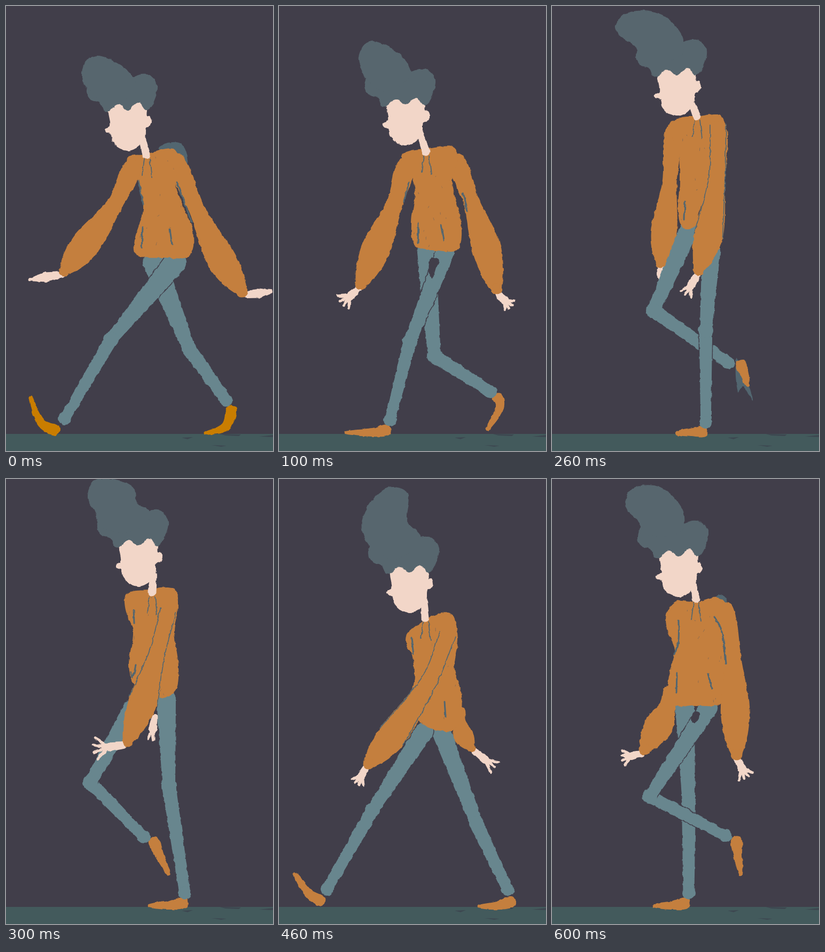
Write an HTML page that moves like this. It is 500 px wide and 833 px high and loops after 0.7 s.

```html
<!DOCTYPE html>
<html lang="en">
<head>
<meta charset="utf-8">
<title>Walk cycle</title>
<style>
html, body { margin: 0; width: 100%; height: 100%; overflow: hidden; background: #413e4a; }
svg { display: block; width: 100%; height: 100%; }
</style>
</head>
<body>
<svg id="stage" viewBox="0 0 500 833">
  <filter id="rough" filterUnits="userSpaceOnUse" x="0" y="0" width="500" height="833" color-interpolation-filters="sRGB">
    <feTurbulence type="fractalNoise" baseFrequency=".09" numOctaves="2" seed="4"/>
    <feDisplacementMap in="SourceGraphic" scale="5" xChannelSelector="R" yChannelSelector="G"/>
  </filter>
  <rect width="500" height="833" fill="#413e4a"/>
  <rect y="801" width="500" height="32" fill="#435a5c"/>
  <path fill="#3d4750" d="M329 808l21-1-10 4zM400 801l40 1-4 3-25-1zM474 806l26-3v4zM385 822l28 1-10 2z"/>
</svg>
<script>
const STEP = 100, COUNT = 7;
const SKIN = '#f2d6c8', CLOTH = '#c47f3e', OCHRE = '#c97d00', JEANS = '#68868e';
const HAIR = '#57666e', SHADE = '#526670', NIGHT = '#413e4a';
const SLEEVE = [15, 15, 27, 10], SHOE = [9, 8, 3];

// Head parts, measured from the left cheek line and the chin
const FACE = '0,-85 35,-92 68,-88 70,-65 75,-65 79,-54 74,-45 68,-43 66,-25 54,-8 36,0 18,-5 6,-17 2,-31 -6,-34 -8,-40 1,-46';
const CURLS = '-3,-73 16,-87 34,-76 54,-90 69,-76 82,-90 90,-122 76,-141 60,-143 42,-138 -30,-138 -43,-114 -37,-97 -18,-89 -11,-75';

const stage = document.getElementById('stage');
const parse = text => text.split(' ').map(p => p.split(',').map(Number));
const shift = (pts, [dx, dy]) => pts.map(([x, y]) => [x + dx, y + dy]);

function add(parent, tag, attrs) {
  const node = document.createElementNS('http://www.w3.org/2000/svg', tag);
  for (const key in attrs) node.setAttribute(key, attrs[key]);
  return parent.appendChild(node);
}

// Smooth curve whose handles scale with each segment, so it never overshoots
function curve(pts, closed) {
  const n = pts.length;
  const at = i => closed ? pts[(i + n) % n] : pts[Math.max(0, Math.min(n - 1, i))];
  const handle = (i, len) => {
    const [ax, ay] = at(i - 1), [bx, by] = at(i + 1);
    const k = 0.3 * len / (Math.hypot(bx - ax, by - ay) || 1);
    return [(bx - ax) * k, (by - ay) * k];
  };
  let d = 'M' + pts[0];
  for (let i = 0; i < (closed ? n : n - 1); i++) {
    const [x0, y0] = at(i), [x1, y1] = at(i + 1);
    const len = Math.hypot(x1 - x0, y1 - y0);
    const [ux, uy] = handle(i, len), [vx, vy] = handle(i + 1, len);
    d += `C${x0 + ux} ${y0 + uy} ${x1 - vx} ${y1 - vy} ${x1} ${y1}`;
  }
  return d + (closed ? 'Z' : '');
}

// The two sides of a spine with a radius at every node
function sides(spine, radii) {
  const side = sign => spine.map(([x, y], i) => {
    const [ax, ay] = spine[Math.max(0, i - 1)], [bx, by] = spine[Math.min(spine.length - 1, i + 1)];
    const k = sign * radii[i] / Math.hypot(bx - ax, by - ay);
    return [x + (by - ay) * k, y - (bx - ax) * k];
  });
  return [side(1), side(-1)];
}

// Tapered bar with round ends
function bone([ax, ay], ra, [bx, by], rb) {
  const len = Math.hypot(bx - ax, by - ay), nx = (ay - by) / len, ny = (bx - ax) / len;
  return `M${ax + nx * ra} ${ay + ny * ra}L${bx + nx * rb} ${by + ny * rb}` +
    `A${rb} ${rb} 0 0 0 ${bx - nx * rb} ${by - ny * rb}` +
    `L${ax - nx * ra} ${ay - ny * ra}A${ra} ${ra} 0 0 0 ${ax + nx * ra} ${ay + ny * ra}Z`;
}

function random(seed) {
  return () => (seed = seed * 16807 % 2147483647) / 2147483647;
}

let index = 0;

function pose(p) {
  const group = add(stage, 'g', { filter: 'url(#rough)', opacity: 0 });
  const fill = (d, color, more) => add(group, 'path', { d, fill: color, ...more });
  const blob = (pts, color) => fill(curve(pts, true), color);
  const line = (pts, width) => fill(curve(pts), 'none', { stroke: SHADE, 'stroke-width': width, 'stroke-linecap': 'round' });
  const dot = ([cx, cy], r, color) => add(group, 'circle', { cx, cy, r, fill: color });

  function spineShape(spine, radii, color) {
    const [a, b] = sides(spine, radii);
    blob([...a, ...b.reverse()], color);
  }

  function hand(text, fingers) {
    const [wrist, tip] = parse(text);
    const dx = tip[0] - wrist[0], dy = tip[1] - wrist[1];
    const palm = [wrist[0] + dx * 0.5, wrist[1] + dy * 0.5];
    fill(bone(wrist, 6, palm, fingers ? 8 : 9), SKIN);
    if (!fingers) fill(bone(palm, 9, tip, 3), SKIN);
    for (let i = 0; i < fingers; i++) {
      const turn = (i - (fingers - 1) / 2) * 0.42, c = Math.cos(turn) * 0.5, s = Math.sin(turn) * 0.6;
      fill(bone(palm, 4, [palm[0] + dx * c - dy * s, palm[1] + dy * c + dx * s], 2.2), SKIN);
    }
  }

  function arm({ sleeve, palm, fingers = 0, slim = 1, over }) {
    hand(palm, fingers);
    if (!sleeve) return;
    const spine = parse(sleeve), radii = SLEEVE.map(r => r * slim);
    spineShape(spine, radii, CLOTH);
    const wrist = spine[3];
    dot(wrist, radii[3] + 0.5, CLOTH);
    if (over) sides(spine, radii).forEach(s => line(s.slice(0, 3), 1.6));
  }

  function leg({ bones, shoe }, near) {
    const [hip, knee, ankle] = parse(bones);
    const rim = near ? { stroke: NIGHT, 'stroke-width': 1.5 } : {};
    spineShape(parse(shoe), SHOE, p.shoes || CLOTH);
    fill(bone(knee, 13, ankle, 10.5), JEANS, rim);
    fill(bone(hip, p.hip || 18, knee, 12), JEANS, rim);
    dot(knee, 14, JEANS);
    dot(ankle, 12, JEANS);
  }

  // Sparse dry-brush flecks inside the shirt
  function flecks(d) {
    const id = 'shirt' + index, rnd = random(index * 97 + 11);
    add(add(group, 'clipPath', { id }), 'path', { d });
    let marks = '';
    for (let i = 0; i < 30; i++) {
      marks += `M${200 + rnd() * 150} ${220 + rnd() * 240}l${rnd() * 3 - 2} ${1 + rnd() * 5}`;
    }
    fill(marks, 'none', { stroke: '#8a6a50', 'stroke-width': 0.9, 'clip-path': `url(#${id})` });
  }

  function head() {
    const origin = parse(p.head)[0], collar = parse(p.neck)[0];
    line(shift([[-4, 8], [-8, 38]], collar), 1.8);
    line(shift([[6, 8], [10, 42]], collar), 1.8);
    fill(bone([origin[0] + 62, origin[1] - 22], 6, collar, 7.5), SKIN);
    blob(shift(parse(FACE), origin), SKIN);
    blob(shift(parse(CURLS), origin), HAIR);
    blob(parse(p.quiff), HAIR);
  }

  if (p.shade) blob(parse(p.shade), SHADE);
  arm(p.farArm);
  leg(p.farLeg);
  leg(p.nearLeg, true);
  if (p.gap) blob(parse(p.gap), NIGHT);
  const shirt = curve(parse(p.torso), true);
  fill(shirt, CLOTH);
  flecks(shirt);
  arm(p.nearArm);
  p.marks.split('|').forEach(m => line(parse(m), 3));
  head();

  const share = 1 / COUNT, total = STEP * COUNT;
  group.animate([
    { opacity: 1, offset: 0 }, { opacity: 1, offset: share },
    { opacity: 0, offset: share }, { opacity: 0, offset: 1 }
  ], { duration: total, delay: index * STEP - total, iterations: Infinity });
  index++;
}

// Heel strike, left
pose({
  head: '194,271', neck: '263,279', shoes: OCHRE, hip: 22,
  quiff: '142,125 150,102 172,93 200,102 236,130 240,165 180,177 160,160 146,147',
  torso: '226,286 262,278 312,267 325,290 317,330 333,378 350,422 344,467 300,471 245,466 241,438 257,380 246,325',
  shade: '285,268 300,257 328,258 341,288 335,304 320,300',
  farArm: { sleeve: '316,284 358,382 405,478 442,535', palm: '450,541 496,534' },
  nearArm: { sleeve: '240,296 204,370 146,450 109,496', palm: '104,503 45,512' },
  farLeg: { bones: '278,480 343,642 412,738', shoe: '424,752 410,788 372,800' },
  nearLeg: { bones: '317,480 197,624 110,772', shoe: '96,796 66,780 45,732' },
  marks: '256,414 254,452|307,419 311,447|320,330 348,405|249,328 257,372'
});

// Weight down
pose({
  head: '203,261', neck: '275,273',
  quiff: '149,95 160,72 178,66 212,80 235,100 246,130 200,160 165,138 152,113',
  torso: '229,282 245,271 286,266 325,264 335,285 324,330 341,405 335,455 300,458 255,448 248,405 255,350 248,315',
  farArm: { sleeve: '330,285 360,365 389,455 407,530', palm: '411,540 434,563', fingers: 4 },
  nearArm: { sleeve: '240,292 217,368 180,458 153,521', palm: '150,528 117,557', fingers: 4 },
  farLeg: { bones: '276,462 291,655 396,722', shoe: '408,728 413,752 390,793' },
  nearLeg: { bones: '311,462 245,628 208,775', shoe: '206,793 175,798 124,798' },
  gap: '282,474 299,474 294,490 285,510',
  marks: '261,408 260,444|304,410 309,438|243,330 234,366|344,350 353,385'
});

// Passing, right foot back
pose({
  head: '200,206', neck: '271,206',
  quiff: '119,38 136,15 175,9 215,22 245,60 240,95 170,100 155,75 126,54',
  torso: '218,225 240,209 275,207 318,207 322,260 300,330 275,385 268,412 246,415 236,385 239,330 236,270',
  shade: '345,660 354,680 376,738 357,712 348,722',
  farArm: { sleeve: '227,230 220,330 209,425 203,481', palm: '204,488 204,514', slim: 0.9 },
  nearArm: { sleeve: '311,222 309,320 293,430 275,494', palm: '272,504 250,540', fingers: 3, over: true },
  farLeg: { bones: '256,420 190,570 330,668', shoe: '352,665 360,688 368,712' },
  nearLeg: { bones: '298,460 288,607 288,780', shoe: '288,796 260,798 232,799' },
  marks: '249,366 248,400'
});

// Left knee up
pose({
  head: '214,201', neck: '273,212',
  quiff: '153,35 163,5 200,0 238,15 246,45 272,66 230,100 180,90 165,58',
  torso: '226,215 265,208 315,206 322,240 315,285 323,350 318,395 292,410 255,395 237,380 230,345 238,285 224,245',
  farArm: { palm: '279,446 271,488', fingers: 2 },
  nearArm: { sleeve: '304,245 283,325 257,415 228,491', palm: '220,498 163,505', fingers: 4, over: true },
  farLeg: { bones: '300,412 305,575 335,775', shoe: '337,793 305,798 267,799' },
  nearLeg: { bones: '236,430 158,568 258,670', shoe: '275,674 288,705 306,741' },
  marks: '234,362 237,370 243,349|239,245 240,270'
});

// Heel strike with the arms crossed over
pose({
  head: '210,251', neck: '274,260',
  quiff: '155,80 170,45 205,16 240,26 240,78 265,110 220,150 175,130 158,105',
  torso: '240,290 270,266 305,250 325,254 335,300 328,350 342,405 338,455 322,472 270,460 248,420 254,370 250,330 238,310',
  farArm: { sleeve: '335,430 339,455 345,480 360,504', palm: '367,510 405,540', fingers: 3, slim: 0.7 },
  nearArm: { sleeve: '316,290 283,375 211,482 168,533', palm: '163,540 146,571', fingers: 4, over: true },
  farLeg: { bones: '305,475 370,645 428,768', shoe: '440,790 410,798 373,800' },
  nearLeg: { bones: '272,472 175,620 90,768', shoe: '82,792 55,775 29,738' },
  marks: '310,417 312,446|248,298 252,328'
});

// Weight over the left foot
pose({
  head: '211,235', neck: '277,245',
  quiff: '156,65 172,22 210,0 254,9 244,50 262,92 230,130 176,115 160,85',
  torso: '231,270 250,250 285,242 318,235 335,255 333,320 334,355 347,415 338,457 308,453 270,442 238,438 242,400 233,330',
  shade: '322,240 327,222 338,262 339,292 336,360 330,320',
  farArm: { sleeve: '298,480 296,495 291,512 289,522', palm: '300,532 333,541', fingers: 3, slim: 0.45 },
  nearArm: { sleeve: '318,260 301,370 265,480 232,546', palm: '228,563 184,593', fingers: 4, over: true },
  farLeg: { bones: '317,455 303,632 400,715', shoe: '419,720 428,750 428,781' },
  nearLeg: { bones: '253,445 234,634 233,775', shoe: '229,797 200,799 155,794' },
  marks: '257,397 251,425|243,305 250,340 250,365 243,404'
});

// Passing, left foot back
pose({
  head: '203,221', neck: '269,224',
  quiff: '137,45 150,18 190,12 222,28 247,65 240,100 180,105 158,75 142,60',
  torso: '215,250 235,228 270,230 310,222 334,245 320,300 325,355 318,418 260,424 230,424 216,390 221,358 230,320 215,280',
  shade: '306,226 313,215 325,222 328,234',
  farArm: { sleeve: '228,392 218,422 200,462 173,506', palm: '168,514 130,522', fingers: 4 },
  nearArm: { sleeve: '322,238 339,335 343,440 346,516', palm: '346,522 365,560', fingers: 4 },
  farLeg: { bones: '249,430 256,605 256,775', shoe: '256,793 225,798 190,799' },
  nearLeg: { bones: '293,428 183,594 325,668', shoe: '345,672 348,705 354,741' },
  gap: '263,437 276,439 266,457',
  marks: '234,364 233,400|293,364 299,393|237,265 237,300 230,328|305,258 319,290 325,345'
});
</script>
</body>
</html>
```
